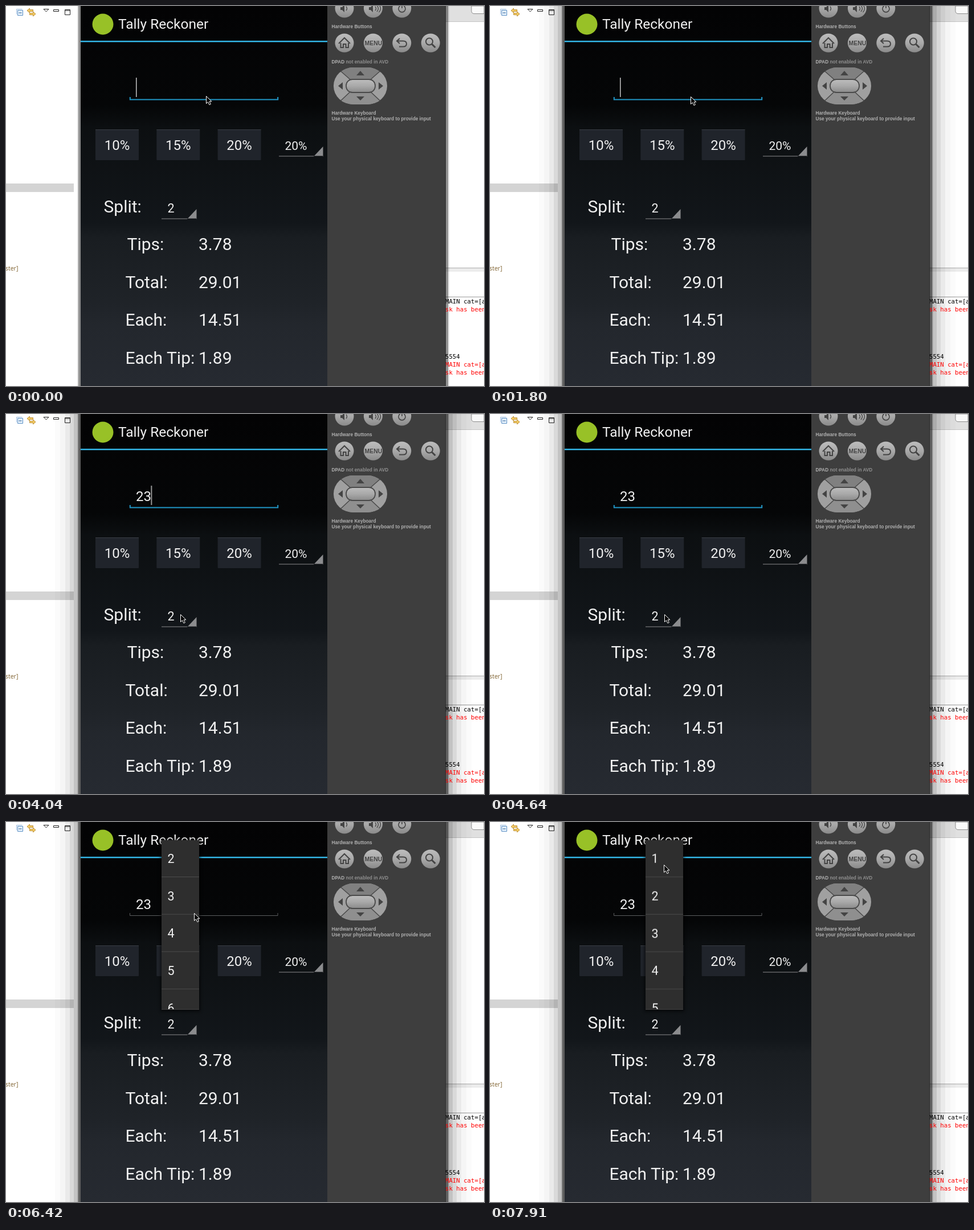
An HTML page for the animation above (8 s loop, 839 by 668 pixels).

```html
<!DOCTYPE html>
<html lang="en">
<head>
<meta charset="utf-8">
<title>Tally Reckoner</title>
<style>
html, body { margin: 0; width: 100%; height: 100%; overflow: hidden; background: #fff; }
svg { display: block; width: 839px; height: 668px; }
text { font-family: Roboto, sans-serif; fill: #f0f0f0; white-space: pre; }
.big { font-size: 30px; }
.btn { font-size: 24px; text-anchor: middle; }
.item { font-size: 21.5px; }
.skin text { font: bold 8.25px "Liberation Sans", Arial, sans-serif; fill: #b0b0b0; }
.log text { font: 10.7px "DejaVu Sans Mono", monospace; fill: #000; }
.log .err { fill: #f00; }

.anim { animation: 8s step-end infinite; }
#soft { animation-name: soft; }
#caret { animation-name: blink, caretX; }
#one { animation-name: one; }
#two { animation-name: two; }
#focus { animation-name: focus; }
#popup { animation-name: popup; }
#list { animation-name: scroll; }
#thumb { animation-name: thumb, thumbFade; }
#mouse { animation-name: mouse; }

@keyframes soft { 0% { opacity: 0 } 1.875%, 100% { opacity: 1 } }
@keyframes blink {
  0%, 11.25%, 22.5%, 35.625%, 50.5% { opacity: 1 }
  3.75%, 16.875%, 30%, 44.875%, 56.125%, 100% { opacity: 0 }
}
@keyframes caretX {
  0% { transform: none }
  35.625% { transform: translateX(13px) }
  37.5%, 100% { transform: translateX(26.5px) }
}
@keyframes one { 0% { opacity: 0 } 35.625%, 100% { opacity: 1 } }
@keyframes two { 0% { opacity: 0 } 37.5%, 100% { opacity: 1 } }
@keyframes focus { 0% { opacity: 1 } 59.875%, 100% { opacity: 0 } }
@keyframes popup { 0% { opacity: 0 } 59.875% { opacity: .5 } 61.75%, 100% { opacity: 1 } }
@keyframes scroll {
  0% { transform: translateY(-65.7px) }
  82.125% { transform: translateY(-69px) }
  84% { transform: translateY(-84px) }
  85.875% { transform: translateY(-96.7px) }
  87.75% { transform: translateY(-38px) }
  89.625%, 100% { transform: none }
}
@keyframes thumb {
  0% { transform: none }
  82.125% { transform: translateY(1.5px) }
  84% { transform: translateY(8px) }
  85.875% { transform: translateY(14px) }
  87.75% { transform: translateY(-13px) }
  89.625%, 100% { transform: translateY(-30px) }
}
@keyframes thumbFade {
  0%, 82.125% { opacity: 1 }
  72.875% { opacity: .5 }
  74.75%, 93.25%, 100% { opacity: 0 }
}
@keyframes mouse {
  0% { transform: translate(351px, 158px) }
  1.875% { transform: translate(352px, 159px) }
  43.125% { transform: translate(349px, 170px) }
  44.875% { transform: translate(338px, 217px) }
  46.75% { transform: translate(318px, 290px) }
  48.625% { transform: translate(306px, 342px) }
  50.5% { transform: translate(306px, 352px) }
  63.625% { transform: translate(313px, 305px) }
  65.5% { transform: translate(323px, 222px) }
  67.375% { transform: translate(332px, 148px) }
  69.125% { transform: translate(335px, 110px) }
  72.875% { transform: translate(333px, 140px) }
  74.75% { transform: translate(331px, 165px) }
  80.25% { transform: translate(330px, 160px) }
  82.125% { transform: translate(329px, 150px) }
  84% { transform: translate(328px, 135px) }
  85.875% { transform: translate(327px, 122px) }
  87.75% { transform: translate(325px, 188px) }
  89.625% { transform: translate(322px, 252px) }
  93.25% { transform: translate(320px, 222px) }
  95.125% { transform: translate(314px, 150px) }
  97% { transform: translate(308px, 98px) }
  98.875%, 100% { transform: translate(305px, 75px) }
}
</style>
</head>
<body>
<svg viewBox="0 0 839 668">
  <defs>
    <linearGradient id="bg" x1="0" y1="0" x2="0" y2="1">
      <stop offset="0" stop-color="#030304"/>
      <stop offset=".26" stop-color="#050607"/>
      <stop offset=".32" stop-color="#0c0f11"/>
      <stop offset=".57" stop-color="#12161a"/>
      <stop offset=".61" stop-color="#191d21"/>
      <stop offset=".78" stop-color="#1f2328"/>
      <stop offset=".84" stop-color="#23272d"/>
      <stop offset="1" stop-color="#262a31"/>
    </linearGradient>
    <linearGradient id="key" x1="0" y1="0" x2="0" y2="1">
      <stop offset="0" stop-color="#bdbdbd"/>
      <stop offset=".5" stop-color="#a9a9a9"/>
      <stop offset="1" stop-color="#8a8a8a"/>
    </linearGradient>
    <clipPath id="box"><path d="M273 32h66v298h-66z"/></clipPath>
    <clipPath id="right"><path d="M772 0h67v668h-67z"/></clipPath>
    <clipPath id="pad"><rect x="575" y="108" width="94" height="65" rx="35" ry="32"/></clipPath>
    <filter id="blur" x="-20%" y="-5%" width="140%" height="110%"><feGaussianBlur stdDeviation="2.5"/></filter>
  </defs>

  <!-- editor window behind -->
  <rect width="839" height="668" fill="#fff"/>
  <rect y="312" width="119" height="15" fill="#d4d4d4"/>
  <g fill="none" stroke="#5b8fc4">
    <path d="M18.500 14.500V5.500H28.500" stroke="#9dbde0"/>
    <path d="M20.500 7.500h9v9h-9z" fill="#e4f0fb"/>
    <path d="M22.500 12h5" stroke="#24588f"/>
  </g>
  <path d="M37 8l4.500-4v2.500h6v3h-6V12zM52 14l-4.500-4v2.500h-6v3h6V18z" fill="#f3cc67" stroke="#b07d1c" stroke-width=".8"/>
  <path d="M66 5.500h9l-4.500 4.500z" fill="#fff" stroke="#222"/>
  <path d="M83.500 6.500h9v3h-9zM103.500 6.500h9v9h-9zM103.500 8h9" fill="#fff" stroke="#222"/>
  <text x="-1" y="465" style="font:10.5px 'Open Sans',sans-serif;fill:#7d5f2c">ster]</text>

  <path d="M772 0h67v27h-67z" fill="#e0e0e0"/>
  <path d="M772 27.500h67" stroke="#c4c4c4"/>
  <path d="M817 0h22v13.500h-17q-5 0-5-5z" fill="#fafafa" stroke="#8c8c8c"/>
  <path d="M772 461h67v6h-67z" fill="#ececec"/>
  <path d="M772 460.500h67" stroke="#ababab"/>
  <path d="M772 511.500h67" stroke="#999"/>
  <path d="M127 0h4v668h-4zM772 0h4v668h-4z" fill-opacity=".36"/>
  <path d="M125 0h6v668h-6zM772 0h6v668h-6z" fill-opacity=".12"/>
  <g id="soft" class="anim"></g>
  <g class="log" clip-path="url(#right)">
    <text x="771" y="523">MAIN cat=[a</text>
    <text x="771" y="537" class="err">sk has been</text>
    <text x="771" y="620">5554</text>
    <text x="771" y="634" class="err">MAIN cat=[a</text>
    <text x="771" y="648" class="err">sk has been</text>
  </g>

  <!-- app screen -->
  <rect x="131" width="433" height="668" fill="url(#bg)"/>
  <rect x="131" y="61" width="433" height="2.500" fill="#33b5e5"/>
  <circle cx="170" cy="32" r="18.500" fill="#98c127"/>
  <text x="197" y="40" font-size="24.5">Tally Reckoner</text>

  <path d="M217.500 160v4.500h259.500v-4.500" fill="none" stroke="#5c5e60"/>
  <path id="focus" class="anim" d="M217.800 160v4.500h259.400v-4.500" fill="none" stroke="#2196c6" stroke-width="2"/>
  <g font-size="24">
    <text id="one" class="anim" x="228" y="153">2</text>
    <text id="two" class="anim" x="241.500" y="153">3</text>
  </g>
  <rect id="caret" class="anim" x="228" y="126" width="1.500" height="34" fill="#c4c4c4"/>

  <g id="buttons"></g>

  <g fill="#8b8c8e">
    <path d="M479 263.500h77v1h-77zM556.500 264.500v-17.500l-16.500 17.500z"/>
    <path d="M273 373.500h61v1h-61zM334.500 374.500v-17.500l-16.500 17.500z"/>
  </g>
  <text x="489.500" y="253" font-size="21">20%</text>
  <text x="283.500" y="363" class="item">2</text>
  <g class="big">
    <text x="171.500" y="363">Split:</text>
    <text x="212.500" y="429">Tips:</text><text x="338" y="429">3.78</text>
    <text x="209.500" y="496">Total:</text><text x="338" y="496">29.01</text>
    <text x="209.500" y="562">Each:</text><text x="338" y="562">14.51</text>
    <text x="209.500" y="629">Each Tip:</text><text x="338" y="629">1.89</text>
  </g>

  <!-- emulator keys -->
  <rect x="564" width="208" height="668" fill="#3e3e3e"/>
  <path d="M771.500 0v668" stroke="#2c2c2c"/>
  <g class="skin">
    <g id="keys" fill="url(#key)"></g>
    <g fill="none" stroke="#444" stroke-width="2">
      <path d="M584 66l10-10 10 10M587.500 65v8h4.500v-6h4.500v6h4.500v-8"/>
      <path d="M691 57l-5 4.500 5 4.500M687 61.500h10q6 0 6 5t-6 5h-7"/>
      <circle cx="743" cy="62.500" r="6"/><path d="M747.500 67l6 6" stroke-width="3"/>
      <path d="M597 1q3 3.500 0 7M648 1q3 3.500 0 7M651 -1q5 5.500 0 11M654.500 -2q6 6.500 0 13" stroke-width="1.300"/>
      <path d="M691.500 0a6 6 0 1 0 7 0M695 -3v7" stroke-width="1.600"/>
    </g>
    <path d="M587 2h3l4-4v13l-4-4h-3zM637 2h3l4-4v13l-4-4h-3z" fill="#444"/>
    <text x="645" y="69" text-anchor="middle" style="font-size:10.5px;fill:#444">MENU</text>
    <g clip-path="url(#pad)">
      <path d="M575 108h94v65h-94z" fill="#a0a0a0"/>
      <path d="M580 108l25 22h34l25-22z" fill="#808080"/>
      <path d="M580 173l25-23h34l25 23z" fill="#8f8f8f"/>
    </g>
    <path d="M588 115l17 15M656 115l-17 15M588 166l17-16M656 166l-17-16" stroke="#4a4a4a" stroke-width="1.500"/>
    <rect x="597" y="129" width="51" height="23" rx="11" fill="url(#key)" stroke="#4a4a4a" stroke-width="1.800"/>
    <path d="M615 122l7-8 7 8zM615 159l7 7 7-7zM591 134v13l-8-6.500zM654 134v13l8-6.500z" fill="#444"/>
    <text x="571.500" y="38.500">Hardware Buttons</text>
    <text x="571.500" y="100.500">DPAD <tspan fill="#8f8f8f">not enabled in AVD</tspan></text>
    <text x="571.500" y="191">Hardware Keyboard</text>
    <text x="571.500" y="201">Use your physical keyboard to provide input</text>
  </g>

  <!-- split menu -->
  <g id="popup" class="anim">
    <rect x="271" y="31" width="70" height="302" fill-opacity=".6" filter="url(#blur)"/>
    <rect x="273" y="32" width="66" height="298" fill="#2e2e2e"/>
    <g clip-path="url(#box)">
      <g id="list" class="anim"></g>
      <rect id="thumb" class="anim" x="330.500" y="66" width="4.500" height="126" fill="#636363"/>
    </g>
    <path d="M273 329.500h66" stroke="#424242"/>
  </g>

  <path id="mouse" class="anim" d="M.5.5v13l3-2.800 2.400 5 2.400-1.100-2.300-4.800h4z" fill="#000" stroke="#fff"/>
</svg>
<script>
const fill = (id, parts) => document.getElementById(id).innerHTML = parts.join("");

// stepped window shadow, mirrored on both sides
fill("soft", [[45, .015], [36, .025], [27, .045], [19, .075], [12, .1], [5, .13]].map(([w, a]) =>
  `<path d="M131 0h${-w}v668h${w}zM772 0h${w}v668h${-w}z" fill-opacity="${a}"/>`));

fill("buttons", [10, 15, 20].map((n, i) => {
  const x = 157 + i * 107.3;
  return `<rect x="${x}" y="217" width="76" height="54" rx="1" fill="#20242b"/>
    <path d="M${x} 217.500h76" stroke="#3b3f46"/>
    <text class="btn" x="${x + 38}" y="253">${n}%</text>`;
}));

fill("keys", [0, 1, 2, 3, 4, 5, 6].map(i =>
  `<circle cx="${594 + i % 4 * 50.4}" cy="${i < 4 ? 65 : 4}" r="16.500"/>`));

fill("list", Array.from({ length: 10 }, (_, i) => {
  const y = i * 65.7;
  return `<text class="item" x="283.500" y="${y + 72}">${i + 1}</text>
    <path d="M273 ${y + 96.5}h66" stroke="#4c4c4c"/>`;
}));
</script>
</body>
</html>
```
